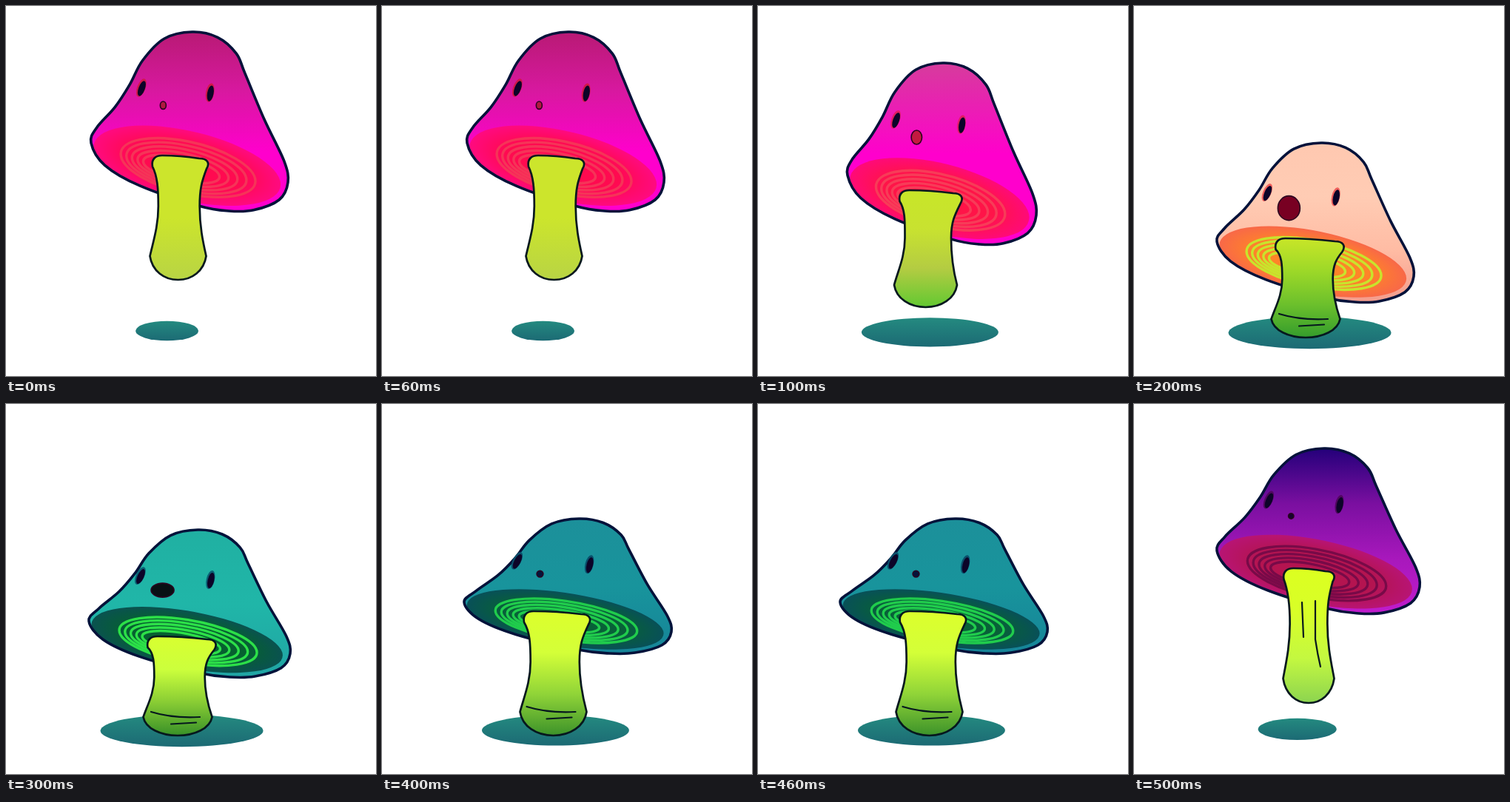
Recreate the animation shown at these times as an HTML page. Size 500x500 px, loop 0.6 s.

```html
<!DOCTYPE html>
<html lang="en">
<head>
<meta charset="utf-8">
<title>Bouncing mushroom</title>
<style>
html, body { margin: 0; width: 100%; height: 100%; overflow: hidden; background: #fff; }
svg { display: block; width: 100%; height: 100%; }
</style>
</head>
<body>
<svg id="stage" viewBox="0 0 500 500"></svg>
<script>
const NS = 'http://www.w3.org/2000/svg';
const STEP = 100;
const RINGS = 5;
const LEAN = .47;

// Key points of the cap in a unit box, clockwise from its top.
const CAP = [
  [.51, 0], [.64, .03], [.736, .12], [.78, .23], [.88, .49], [.98, .72], [1, .84],
  [.955, .938], [.825, .995], [.7, 1], [.55, .972], [.25, .86], [.07, .745],
  [0, .62], [.026, .535], [.118, .42], [.192, .295], [.257, .16], [.367, .038]
];

// cap: x, y, width, height. mouth: radii. shadow: radius.
// stem: top x and y, half width, base x and y, bottom y.
const poses = [
  {
    cap: [115, 35, 266, 242], mouth: [4, 5.2], stem: [235, 203, 38, 232.5, 338, 370], shadow: 42.5,
    skin: ['#b81a74', '#d818a0', '#ff00cc', '#ff00cc'], flesh: ['#ff0a50', '#ff0a80'],
    sap: ['#cce52c', '#cce52c', '#b8d444'],
    ring: '#f53458', halo: '#d01848', lip: '#b01840'
  },
  {
    cap: [121, 77, 255, 245], mouth: [7.2, 9.5], stem: [233, 250, 42.5, 226.5, 377, 407], shadow: 92.5,
    skin: ['#d63c9c', '#ff00cc', '#ff00cc'], flesh: ['#ff1448', '#ff0a78'],
    sap: ['#c8e628', '#c8e230', '#b4cc42', '#62c832'],
    ring: '#f73c58', halo: '#e01c60', lip: '#c4193f'
  },
  {
    cap: [112, 185, 266, 215], mouth: [15, 16.5], stem: [237, 315, 46.5, 232, 423, 448], shadow: 110,
    skin: ['#ffc8b0', '#ffccb4', '#ffbca4', '#f49c8c'], flesh: ['#ff8428', '#f86848'],
    sap: ['#c8e628', '#9cd828', '#6cc02c', '#349c2c'], folds: 'squash',
    ring: '#c8e42c', halo: '#f0605c', lip: '#780022'
  },
  {
    cap: [112, 170, 272, 199], mouth: [15.5, 9.5], stem: [237, 315, 46.5, 232, 423, 448], shadow: 110,
    skin: ['#20b0a2', '#20b6a8', '#20a4a4'], flesh: ['#066030', '#0a5250'],
    sap: ['#d8ff30', '#ccff3c', '#88cc34', '#389028'], folds: 'squash',
    ring: '#2ce048', halo: '#0b6074', lip: '#081014'
  },
  {
    cap: [111, 155, 280, 182], mouth: [4.4, 4.4], stem: [236, 281, 45, 231.5, 416, 448], shadow: 99.5,
    skin: ['#1c909a', '#18949c', '#168498'], flesh: ['#086038', '#085058'],
    sap: ['#dcff2c', '#d4ff38', '#90d438', '#3c922a'], folds: 'squash',
    ring: '#20cc4c', halo: '#0a506c', lip: '#04143a'
  },
  {
    cap: [112, 60, 274, 223], mouth: [3.7, 3.7], stem: [236, 223, 34.5, 236, 371, 404], shadow: 53,
    skin: ['#24007a', '#7a0fa0', '#a818bc', '#c01ccc'], flesh: ['#b41450', '#b81474'],
    sap: ['#dcff20', '#d8ff28', '#c4f840', '#8cd450'], folds: 'stretch',
    ring: '#780a48', halo: '#500860', lip: '#14042c'
  }
];

const svg = document.getElementById('stage');

function set(el, attrs) {
  for (const key in attrs) el.setAttribute(key, attrs[key]);
  return el;
}

function add(tag, attrs = {}, parent = svg) {
  return parent.appendChild(set(document.createElementNS(NS, tag), attrs));
}

function gradient(id, tag = 'linearGradient') {
  return add(tag, { id, x1: 0, y1: 0, x2: 0, y2: 1 }, defs);
}

// Spreads the colours evenly from offset `from` to the end.
function setStops(grad, colors, from = 0) {
  grad.replaceChildren();
  colors.forEach((color, i) => {
    const offset = from + (1 - from) * i / (colors.length - 1);
    add('stop', { offset, 'stop-color': color }, grad);
  });
}

function setOval(el, cx, cy, rx, ry, tilt = 0) {
  set(el, { cx, cy, rx, ry, transform: `rotate(${tilt} ${cx} ${cy})` });
}

// Closed Catmull-Rom curve.
function smooth(points) {
  const n = points.length;
  const at = i => points[(i + n) % n];
  let d = 'M' + at(0);
  for (let i = 0; i < n; i++) {
    const [a, b, c, e] = [at(i - 1), at(i), at(i + 1), at(i + 2)];
    const p = b.map((v, k) => v + (c[k] - a[k]) / 6);
    const q = c.map((v, k) => v - (e[k] - b[k]) / 6);
    d += `C${p} ${q} ${c}`;
  }
  return d + 'Z';
}

const defs = add('defs');
const skin = gradient('skin');
const sap = gradient('sap');
const flesh = gradient('flesh', 'radialGradient');
setStops(gradient('shade'), ['#248a80', '#1c6a74']);
const clipPath = add('path', {}, add('clipPath', { id: 'inside' }, defs));

const shadow = add('ellipse', { fill: 'url(#shade)' });
const cap = add('path', { fill: 'url(#skin)' });
// The underside is a unit disc, sheared and scaled into the cap.
const gills = add('g', {}, add('g', { 'clip-path': 'url(#inside)' }));
add('circle', { r: 1, fill: 'url(#flesh)' }, gills);
const rings = add('g', { fill: 'none', 'stroke-width': 3.4 }, gills);
for (let k = 0; k < RINGS; k++) {
  add('ellipse', {
    cx: .01 - k * .018, cy: .05 + k * .02, rx: .72 - k * .078, ry: .74 - k * .1,
    'vector-effect': 'non-scaling-stroke'
  }, rings);
}
const rim = add('path', { fill: 'none', stroke: '#03123a', 'stroke-width': 3.6 });
const eyes = [
  { x: .255, y: .312, tilt: 20, turn: 7 },
  { x: .604, y: .339, tilt: 10, turn: 4 }
].map(eye => ({
  ...eye,
  halo: add('ellipse'),
  pupil: add('ellipse', { fill: '#0c0428' })
}));
const mouth = add('ellipse', { stroke: '#2c0420', 'stroke-width': 1.6 });
const ink = { stroke: '#06181e', 'stroke-width': 2.7, 'stroke-linejoin': 'round' };
const stem = add('path', { ...ink, fill: 'url(#sap)' });
const folds = add('path', { ...ink, fill: 'none', 'stroke-width': 2.2, 'stroke-linecap': 'round' });

function drawCap({ cap: [x, y, w, h], mouth: [rx, ry], ring, halo, lip }) {
  const flat = (.93 - h / w) / .28;
  const place = (u, v) => [x + u * w, y + v * h];

  // A flatter cap pushes its left shoulder inwards.
  const outline = smooth(CAP.map(([u, v]) =>
    place(u + .09 * flat * (1 - u) * Math.sqrt(Math.max(0, 1 - v / .62)), v)));
  for (const el of [cap, rim, clipPath]) set(el, { d: outline });

  const [ex, ey] = [w * .475, h * .224];
  const shape = [ex, ey * LEAN, 0, ey * Math.sqrt(1 - LEAN * LEAN), ...place(.488, .747)];
  set(gills, { transform: `matrix(${shape})` });
  set(rings, { stroke: ring });

  for (const eye of eyes) {
    const [cx, cy] = place(eye.x, eye.y);
    const tilt = eye.tilt + eye.turn * flat;
    setOval(eye.halo, cx, cy, 5.6, 12.8, tilt);
    setOval(eye.pupil, cx + .6, cy + 1, 4.3, 10.8, tilt);
    set(eye.halo, { fill: halo });
  }
  setOval(mouth, ...place(.366, .41), rx, ry);
  set(mouth, { fill: lip });
}

function stemPath([tx, ty, w, bx, by, end]) {
  const [nx, ny, n] = [(tx + bx) / 2, (ty + by) / 2, w * .735];
  const h = (by - ty) / 2;
  const chin = by + (end - by) * .62;
  const [l, r] = [tx - w, tx + w];
  return `M${l + 1} ${ty + 14}C${l - 1} ${ty + 4} ${l + 5} ${ty - 1} ${l + 14} ${ty - 1}
    Q${tx} ${ty - 1} ${r - 12} ${ty + 3}C${r - 1} ${ty + 3} ${r + 3} ${ty + 9} ${r - 2} ${ty + 17}
    C${tx + w * .78} ${ty + h * .5} ${nx + n} ${ny - h * .35} ${nx + n} ${ny}
    C${nx + n} ${ny + h * .4} ${bx + w * .88} ${by - h * .3} ${bx + w} ${by}
    C${bx + w - 3} ${chin} ${bx + w / 2} ${end} ${bx} ${end}
    C${bx - w / 2} ${end} ${bx - w + 3} ${chin} ${bx - w} ${by}
    C${bx - w * .88} ${by - h * .3} ${nx - n} ${ny + h * .4} ${nx - n} ${ny}
    C${nx - n} ${ny - h * .35} ${tx - w * .8} ${ty + h * .4} ${l + 1} ${ty + 14}Z`;
}

const foldPaths = {
  squash: ([, , , bx, by]) => `M${bx - 36} ${by - 7}q29 9 66 7M${bx - 9} ${by + 9.5}l34 -2`,
  stretch: ([tx, ty]) => `M${tx - 9} ${ty + 45}l2 47M${tx + 9} ${ty + 43}v52q3 20 7 37`
};

function draw(pose) {
  setStops(skin, pose.skin);
  setStops(flesh, pose.flesh, .6);
  setStops(sap, pose.sap);
  drawCap(pose);
  set(stem, { d: stemPath(pose.stem) });
  set(folds, { d: pose.folds ? foldPaths[pose.folds](pose.stem) : '' });
  // A wider shadow also slides right and down.
  const r = pose.shadow;
  setOval(shadow, 205 + r * .296, 437.5 + r * .036, r, 8 + r * .125);
}

const start = performance.now();
let shown = -1;

function tick() {
  const index = Math.floor((performance.now() - start) / STEP) % poses.length;
  if (index !== shown) draw(poses[shown = index]);
  requestAnimationFrame(tick);
}
tick();
</script>
</body>
</html>
```
